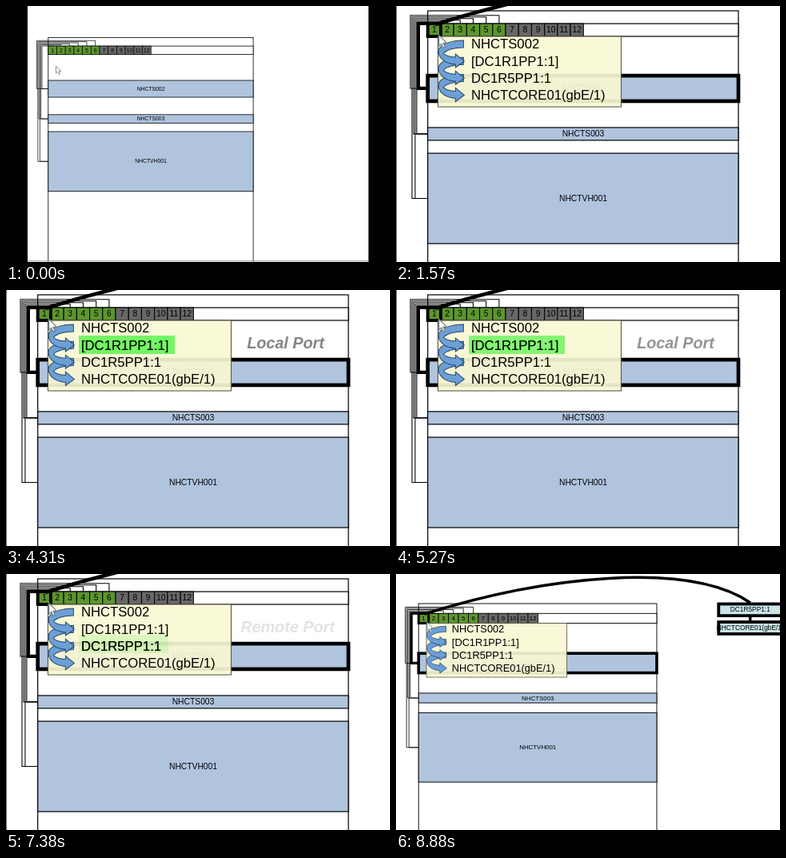
These frames come from a looping animation (480 px wide and 320 px high, 8.94 s). An HTML page with a canvas:

```html
<!DOCTYPE html>
<html lang="en">
<head>
<meta charset="utf-8">
<title>Patch panel trace</title>
<style>
  html, body { margin: 0; width: 100%; height: 100%; overflow: hidden; background: #000; }
  canvas { display: block; }
</style>
</head>
<body>
<canvas id="stage" width="480" height="320"></canvas>
<script>
const ctx = document.getElementById('stage').getContext('2d');
const LOOP = 8940, HOVER = 450;
const SANS = '"Liberation Sans", Arial, sans-serif';

// Camera poses: scale, x offset, y offset
const WIDE = [1, 0, 0], CLOSE = [1.5156, -40.33, -53.87], TRACE = [1.162, -33.1, -8.9];

const LEFT = 52.8, RIGHT = 309, MID = 181, CELL = 10.7;
const DEVICES = [
  { name: 'NHCTS002', top: 93, bottom: 114 },
  { name: 'NHCTS003', top: 135.8, bottom: 146.3 },
  { name: 'NHCTVH001', top: 157, bottom: 231.5 }
];
const PORT_DEVICE = [0, 1, 2, 1, 2, 0];
const TIP_LINES = ['NHCTS002', '[DC1R1PP1:1]', 'DC1R5PP1:1', 'NHCTCORE01(gbE/1)'];

// Highlight boxes and captions stay fixed on the stage while the camera moves
const NOTES = [
  { text: 'Local Device', x: 353.5, from: 1970, to: 3830, ramp: 900, box: [90, 38, 102, 22] },
  { text: 'Local Port', x: 349.5, from: 3830, to: 5690, ramp: 900, box: [91, 57, 120, 23] },
  { text: 'Remote Port', x: 352, from: 5640, to: 7490, ramp: 900, box: [91, 76, 112, 23] },
  { text: 'Remote Device', x: 354.5, from: 7440, to: 8880, ramp: 690, box: [89, 97, 182, 25] }
];

const ARROW = new Path2D('M0-5C-14-5-28-1-31 6C-33 16-24 24-10 25V29L1 21L-10 12V16C-18 16-24 13-25 11C-20 6-10 4 0 4Z');
const CURSOR = new Path2D('M0 0V9L2.1 7.2L3.6 10.6L5.1 9.9L3.6 6.6H6.4Z');

const clamp = v => Math.max(0, Math.min(1, v));
const mix = (a, b, p) => a + (b - a) * p;

function camera(t) {
  const zoomOut = t > 8045;
  const p = clamp(zoomOut ? (t - 8045) / 835 : t / 1570);
  const [a, b] = zoomOut ? [CLOSE, TRACE] : [WIDE, CLOSE];
  return a.map((v, i) => mix(v, b[i], p));
}

function box(x1, y1, x2, y2, fill, width = 0.8) {
  if (fill) {
    ctx.fillStyle = fill;
    ctx.fillRect(x1, y1, x2 - x1, y2 - y1);
  }
  ctx.lineWidth = width;
  ctx.strokeRect(x1, y1, x2 - x1, y2 - y1);
}

function label(text, x, y, size = 6.8, align = 'center') {
  ctx.font = `${size}px ${SANS}`;
  ctx.textAlign = align;
  ctx.fillStyle = '#000';
  ctx.fillText(text, x, y);
}

function line(points, width) {
  ctx.lineWidth = width;
  ctx.beginPath();
  points.forEach(p => ctx.lineTo(...p));
  ctx.stroke();
}

function cable(port, width) {
  const device = DEVICES[PORT_DEVICE[port]];
  const x = LEFT + CELL * (port + 0.5);
  const side = 45 - 1.3 * port, top = 50 - 1.35 * port;
  const y = (device.top + device.bottom) / 2;
  line([[x, 50.3], [x, top], [side, top], [side, y], [LEFT, y]], width);
}

function rack() {
  ctx.strokeStyle = '#000';
  box(LEFT, 39.5, RIGHT, 400);
  box(LEFT, 50.1, RIGHT, 60.6, '#fff');
  PORT_DEVICE.forEach((_, port) => cable(port, 0.7));
  for (let i = 0; i < 12; i++) {
    const x = LEFT + CELL * i;
    box(x, 50.1, x + CELL, 60.6, i < 6 ? '#5c962e' : '#676767', 0.7);
    label(i + 1, x + CELL / 2, 55.7);
  }
  for (const { name, top, bottom } of DEVICES) {
    box(LEFT, top, RIGHT, bottom, '#b0c4de');
    label(name, MID, (top + bottom) / 2 + 0.3);
  }
}

function route() {
  cable(0, 2.8);
  box(LEFT, 50.1, LEFT + CELL, 60.6, null, 2.6);
  box(LEFT, DEVICES[0].top, RIGHT, DEVICES[0].bottom, null, 3.1);

  ctx.lineWidth = 3;
  ctx.beginPath();
  ctx.moveTo(59, 50.7);
  ctx.bezierCurveTo(187.7, 10.2, 342.6, -7, 409.7, 38.6);
  ctx.stroke();
  line([[409.5, 52], [409.5, 60]], 3);
  [[TIP_LINES[2], 39.9], [TIP_LINES[3], 59.3]].forEach(([text, y]) => {
    box(375.6, y, 443.4, y + 12.7, '#c9e5e8', 3);
    label(text, 409.5, y + 6.6, 7.2);
    box(375.6, y, 443.4, y + 12.7, null, 3);
  });
}

function tipLine(i) {
  label(TIP_LINES[i], 88.6, 67.8 + 14 * i, 11, 'left');
}

function tooltip() {
  ctx.strokeStyle = '#55554a';
  box(61.2, 60.6, 212.3, 118.7, 'rgba(249,248,212,.92)', 0.7);
  ctx.fillStyle = '#6b9fd6';
  ctx.strokeStyle = '#26476b';
  ctx.lineWidth = 1;
  // Bottom first, so each arrowhead lies over the next arrow's tail
  for (let i = 2; i >= 0; i--) {
    ctx.save();
    ctx.translate(82.3, 67.2 + 14 * i);
    ctx.scale(0.66, 0.66);
    ctx.fill(ARROW);
    ctx.stroke(ARROW);
    ctx.restore();
  }
  TIP_LINES.forEach((_, i) => tipLine(i));
}

function cursor(t) {
  const p = clamp(t / 400);
  ctx.save();
  ctx.translate(mix(62.5, 62, p), mix(75, 59.5, p));
  ctx.fillStyle = '#fff';
  ctx.strokeStyle = '#6f7f86';
  ctx.lineWidth = 0.8;
  ctx.fill(CURSOR);
  ctx.stroke(CURSOR);
  ctx.restore();
}

function note({ text, x, from, to, ramp, box: area }, i, t, view) {
  const alpha = clamp(Math.min(t - from, to - t) / ramp);
  if (!alpha) return;
  ctx.setTransform(1, 0, 0, 1, 0, 0);
  ctx.globalAlpha = alpha;
  ctx.fillStyle = '#00f300';
  ctx.fillRect(...area);
  ctx.fillStyle = '#1a1a1a';
  ctx.font = `italic bold 19.8px ${SANS}`;
  ctx.textAlign = 'center';
  ctx.fillText(text, x, 68);
  ctx.globalAlpha = 1;
  view();
  tipLine(i);
}

function draw(now) {
  const t = now % LOOP;
  const [s, x, y] = camera(t);
  const view = () => ctx.setTransform(s, 0, 0, s, x, y);

  ctx.setTransform(1, 0, 0, 1, 0, 0);
  ctx.fillStyle = '#000';
  ctx.fillRect(0, 0, 480, 320);
  view();
  ctx.textBaseline = 'middle';
  ctx.fillStyle = '#fff';
  ctx.fillRect(27, -10, 426, 400);

  rack();
  ctx.fillStyle = '#aaa';
  ctx.fillRect(27, 318, 426, 1.2);
  if (t >= HOVER) {
    route();
    tooltip();
  }
  NOTES.forEach((n, i) => note(n, i, t, view));
  cursor(t);
}

const start = performance.now();
function tick() {
  draw(performance.now() - start);
  requestAnimationFrame(tick);
}
tick();
</script>
</body>
</html>
```
